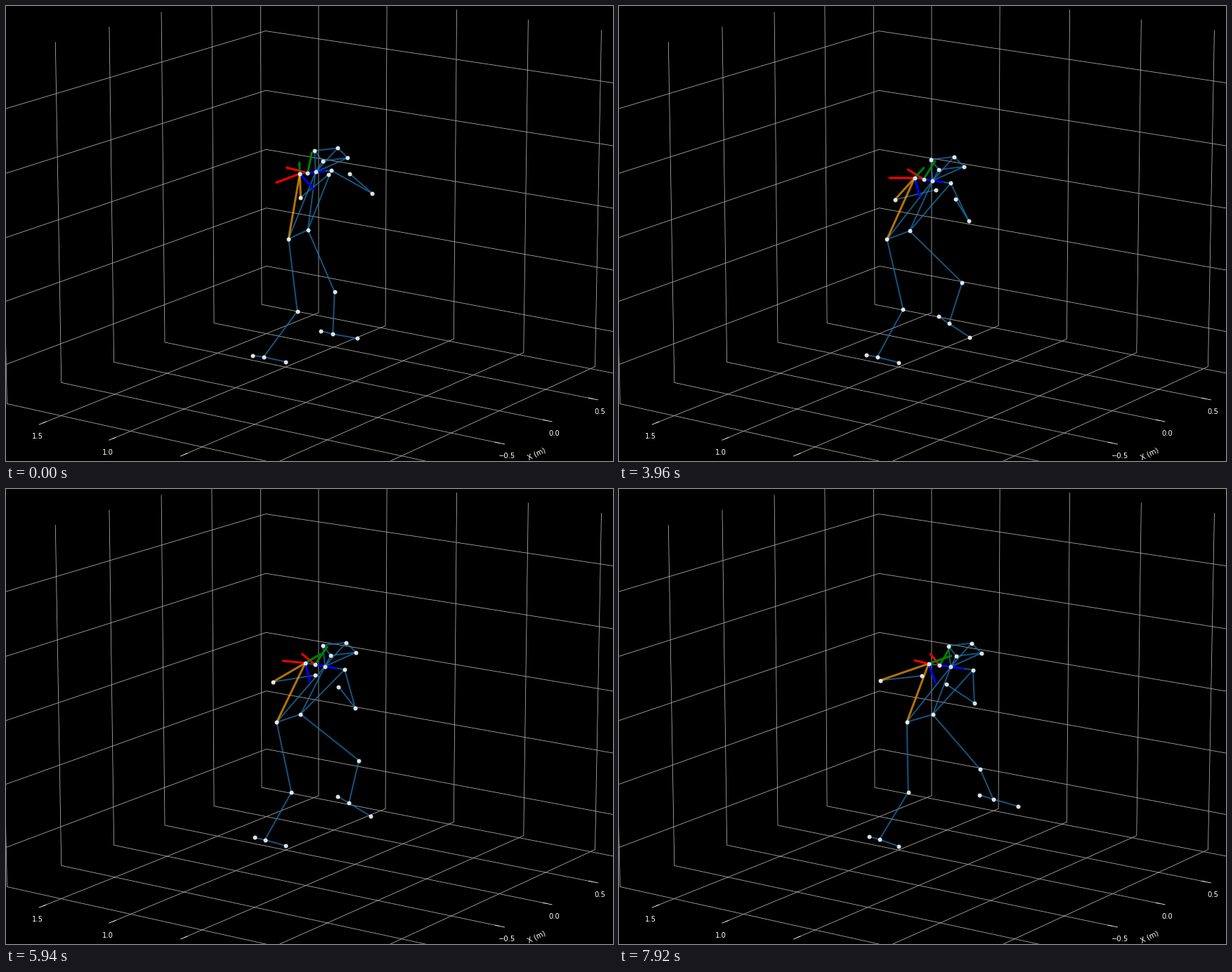
Recreate the animation shown at these times as a matplotlib script. Size 864 by 648 pixels, loop 8000 ms.

```python
import numpy as np
import matplotlib.pyplot as plt
from matplotlib.animation import FuncAnimation
from matplotlib.collections import LineCollection

W, H, DPI = 864, 648, 72
LOOP, TICK, HOLD = 8000, 40, 330
LAST_POSE = LOOP // HOLD

plt.rcParams["font.family"] = "DejaVu Sans"
fig = plt.figure(figsize=(W / DPI, H / DPI), dpi=DPI, facecolor="black")
ax = fig.add_axes([0, 0, 1, 1])
ax.set_xlim(0, W)
ax.set_ylim(H, 0)
ax.axis("off")

# Room camera: floor corner, vanishing point and depth weight per grid step
CORNER = np.array([371, 422.4])
VANISH = np.array([[-8155, -1239], [4632, -1239], [445, 21450]])
DEPTH = np.array([-0.010845, -0.015634, -0.0039])
FIRST_X, FIRST_Y, FIRST_Z, END = 0.793, 0.105, 0.632, 5.44


def project(*grid):
    w = DEPTH * grid
    return (CORNER + w @ VANISH) / (1 + w.sum())


def tick_label(value, spot, shift):
    text = f"{value:.1f}".replace("-", "\u2212")
    ax.text(*(spot + shift), text, color="white", size=10,
            ha="center", va="center_baseline")


def draw_room():
    xs, ys, zs = (np.arange(first, END) for first in (FIRST_X, FIRST_Y, FIRST_Z))
    lines = [[(x, 0, END), (x, 0, 0), (x, END, 0)] for x in xs]
    lines += [[(0, y, END), (0, y, 0), (END, y, 0)] for y in ys]
    lines += [[(0, END, z), (0, 0, z), (END, 0, z)] for z in zs]
    lines = [[project(*p) for p in line] for line in lines]
    ax.add_collection(LineCollection(lines, colors="#b0b0b0", linewidths=0.8))

    ends = (END - 0.066, END + 0.066)
    ticks = [[project(x, e, 0) for e in ends] for x in xs]
    ticks += [[project(e, y, 0) for e in ends] for y in ys]
    ax.add_collection(LineCollection(ticks, colors="white", linewidths=0.8))

    for n, x in enumerate(xs):
        tick_label(1.5 - n / 2, project(x, END, 0), (-6.8, 18.3))
    for n, y in enumerate(ys):
        tick_label(1 - n / 2, project(END, y, 0), (9.7, 17.6))
    ax.text(755, 638, "X (m)", color="white", size=10, rotation=26,
            ha="center", va="center")


def curve(u, *keys):
    """Polynomial in u (0..1) through evenly spaced keys."""
    nodes = np.linspace(0, 1, len(keys))
    total = 0
    for i, key in enumerate(keys):
        others = np.delete(nodes, i)
        total = total + np.array(key) * np.prod((u - others) / (nodes[i] - others))
    return total


def smooth(s):
    s = min(max(s, 0), 1)
    return s * s * (3 - 2 * s)


def triad(a, b, c):
    """Red, green and blue unit axes on screen for three turn angles."""
    (sa, sb, sc), (ca, cb, cc) = np.sin([a, b, c]), np.cos([a, b, c])
    right = np.array([-cb * ca, cb * sa, sb])
    down = np.array([-cc * sa + sc * sb * ca, -cc * ca - sc * sb * sa, sc * cb])
    return np.column_stack([38.4 * right, 29.4 * down])


CHAINS = ["crown brow face jaw crown neck brow", "face neck jaw",
          "rs collar neck ls le lw", "re rw", "rh neck lh ls", "rh lh",
          "rh rk ra rheel", "ra rtoe", "lh lk la lheel", "la ltoe"]
BONES = [pair for c in CHAINS for pair in zip(c.split(), c.split()[1:])]
ARM_ANGLE = [("rs", "re"), ("rs", "rh")]


def pose(u):
    """Joint positions and the axes of the upper arm and the collar."""
    arm = triad(*np.radians(curve(u, (-1, 30, 57.5), (20, 10.6, 63), (58.6, 14.5, 71))))
    trunk = triad(*np.radians(curve(u, (11, 38, -6), (36, 44.8, 11), (48, 60, 18.5))))
    p = {}

    # The shoulder line follows the trunk's blue axis
    p["rs"] = curve(u, (418.2, 238.8), (418.7, 242.3), (424.7, 247.3), (440.7, 248.8))
    for name, reach in (("collar", 0.475), ("neck", 0.95), ("ls", 1.9)):
        p[name] = p["rs"] + reach * trunk[2]

    # The head is rigid and leans back a little
    crown = p["neck"] + curve(u, (-1.5, -30.3), (-3.6, -29.7))
    for name, offset in (("crown", (0, 0)), ("brow", (33.1, -4)),
                         ("face", (47.3, 10.1)), ("jaw", (11.4, 14.4))):
        p[name] = crown + offset

    # The upper arm lies along its own green axis
    p["re"] = p["rs"] - 2.18 * arm[1]
    p["rw"] = p["re"] + curve(u, (40, -33), (58, -14), (59, -6.5))
    p["le"] = p["ls"] + curve(u, (58, 32.5), (26, 54), (2, 47))
    p["lw"] = p["le"] + curve(u, (-32, -28), (-19, -31), (-40, -26.5))

    p["rh"] = curve(u, (402.2, 331.8), (384.7, 332.2), (383.7, 332.2), (409.7, 331.8))
    p["lh"] = p["rh"] + curve(u, (27.5, -13), (36.8, -10.7))

    # Standing leg: the foot stays on the floor
    p["rk"] = curve(u, (414.7, 434.7), (405.2, 432.8), (405.7, 432), (411.7, 431.8))
    p["ra"] = curve(u, (366.7, 499.8), (367.5, 500), (370.7, 499.2))
    p["rheel"] = p["ra"] + curve(u, (-16, -2), (-14.5, -4))
    p["rtoe"] = curve(u, (398.3, 506.8), (398.3, 508.7))

    # Stepping leg: the foot lifts, then swings forward
    p["lk"] = curve(u, (467.7, 407.3), (477.7, 402.3), (499.7, 387.3), (514.2, 399.3))
    p["la"] = curve(u, (465.2, 467.2), (469.7, 452.3), (465.2, 441.8))
    p["la"] = p["la"] + (67.5 * smooth((u - 0.55) / 0.45), 0)
    p["lheel"] = p["la"] + curve(u, (-17.5, -4.5), (-14.8, -10.3), (-19.5, -6))
    p["ltoe"] = p["la"] + curve(u, (34.5, 6), (29.5, 19.3), (35, 10))
    return p, arm, trunk


draw_room()
bones = LineCollection([], colors="#1f77b4", linewidths=2, alpha=0.7, zorder=3)
angle = LineCollection([], colors="orange", linewidths=3, alpha=0.7, zorder=4)
triads = LineCollection([], colors=["red", "green", "blue"], linewidths=3, zorder=5)
for group in (bones, angle, triads):
    group.set_capstyle("projecting")
    ax.add_collection(group)
joints, = ax.plot([], [], "o", color="white", ms=5, mew=1, alpha=0.85, zorder=6)


def update(i):
    p, arm, trunk = pose((i * TICK // HOLD) / LAST_POSE)
    bones.set_segments([(p[a], p[b]) for a, b in BONES])
    angle.set_segments([(p[a], p[b]) for a, b in ARM_ANGLE])
    triads.set_segments([(p[root], p[root] + axis)
                         for root, axes in (("collar", trunk), ("rs", arm))
                         for axis in axes])
    joints.set_data(*np.array(list(p.values())).T)
    return bones, angle, triads, joints


anim = FuncAnimation(fig, update, frames=LOOP // TICK, interval=TICK,
                     repeat=True, repeat_delay=0)
plt.show()
```
